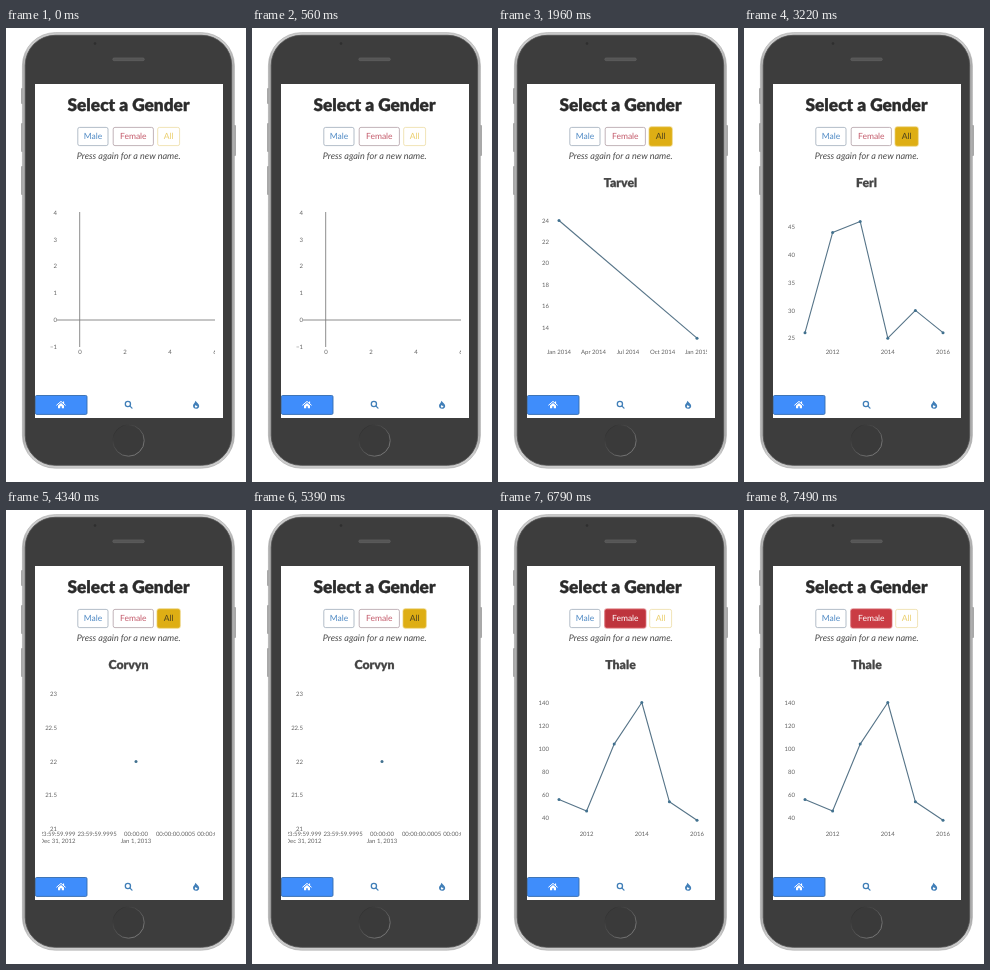
An HTML page that plays this animation: 240x454 px, repeating every 8 s.

```html
<!DOCTYPE html>
<html lang="en">
<head>
<meta charset="utf-8">
<title>Name popularity app</title>
<style>
  html, body { margin: 0; width: 100%; height: 100%; overflow: hidden; background: #fff; }
  svg { display: block; width: 100vw; height: 100vh; }
  text { font-family: Lato, "Open Sans", sans-serif; text-anchor: middle; text-rendering: geometricPrecision; }
  .round { font-weight: 900; stroke-linejoin: round; paint-order: stroke; }
  .label { font-size: 6px; fill: #606060; }
  .label.y { text-anchor: end; }
  .axis { stroke: #808080; stroke-width: .9; }
  .line { fill: none; stroke: #567488; stroke-width: 1.1; stroke-linejoin: round; }
  .dot { fill: #41718f; }
</style>
</head>
<body>
<svg id="stage" viewBox="0 0 240 454">
  <defs>
    <linearGradient id="rim" x2="1" y2="0">
      <stop offset="0" stop-color="#a9a9a9"/>
      <stop offset=".03" stop-color="#cbcbcb"/>
      <stop offset=".97" stop-color="#cbcbcb"/>
      <stop offset="1" stop-color="#a9a9a9"/>
    </linearGradient>
    <linearGradient id="ring" x2="1" y2="1">
      <stop offset=".15" stop-color="#333"/>
      <stop offset=".85" stop-color="#777"/>
    </linearGradient>
    <clipPath id="plot"><rect x="36" y="170" width="173" height="175"/></clipPath>
  </defs>

  <!-- phone -->
  <g fill="#a8a8a8">
    <rect x="15" y="60" width="3" height="16" rx="1"/>
    <rect x="15" y="95" width="3" height="29" rx="1"/>
    <rect x="15" y="138" width="3" height="29" rx="1"/>
    <rect x="227" y="97" width="3" height="31" rx="1"/>
  </g>
  <rect x="16.400" y="4.600" width="212" height="435.600" rx="33" fill="url(#rim)" stroke="#aaa" stroke-width=".6"/>
  <rect x="19.200" y="7.300" width="206.500" height="430" rx="30" fill="#3d3d3d" stroke="#505050" stroke-width=".8"/>
  <circle cx="89" cy="15.500" r="1.300" fill="#2e2e2e"/>
  <rect x="106.800" y="29.900" width="31.500" height="2.800" rx="1.400" fill="#555" stroke="#686868" stroke-width=".5"/>
  <circle cx="122.500" cy="412.500" r="15.700" fill="#3a3a3a" stroke="url(#ring)" stroke-width="1"/>
  <rect x="29" y="56" width="188" height="334" fill="#fff"/>

  <!-- page -->
  <text class="round" x="122.500" y="83" font-size="17.300" fill="#2b2b2b" stroke="#2b2b2b" stroke-width=".35">Select a Gender</text>
  <g id="buttons"></g>
  <text x="122.700" y="130.500" font-size="9.050" font-style="italic" fill="#4a4a4a">Press again for a new name.</text>
  <text id="name" class="round" x="122.500" y="159" font-size="12.300" fill="#444" stroke="#444" stroke-width=".25"></text>
  <g id="chart" clip-path="url(#plot)"></g>

  <!-- tab bar -->
  <rect x="29.400" y="367.500" width="51.600" height="18.900" rx="1.300" fill="#3f8dfb" stroke="#356cae" stroke-width=".9"/>
  <g fill="#fff">
    <path d="M50.700 377.100 L55 373.400 L59.300 377.100" fill="none" stroke="#fff" stroke-width="1" stroke-linecap="round"/>
    <path d="M52 377.500 L55 375 L58 377.500 V380.200 H55.800 V378.300 H54.200 V380.200 H52 Z"/>
    <rect x="57" y="373.500" width="1.100" height="2"/>
  </g>
  <g fill="none" stroke="#417fb8" stroke-width="1.300" stroke-linecap="round">
    <circle cx="121.900" cy="376" r="2.600"/>
    <path d="M124 378.100 L126 380.100"/>
  </g>
  <path d="M189.500 372.800 C190.500 374.600 193.200 375.800 193.200 377.900 C193.200 379.700 191.800 380.800 190.100 380.800 C188.300 380.800 187 379.600 187 377.800 C187 376 189 375.100 189.500 372.800 Z M190.100 379.500 C191.400 379.400 191.800 378.200 191 377.400 L190.300 378 L189.500 376.900 C188.400 378.200 188.700 379.500 190.100 379.500 Z" fill="#417fb8" fill-rule="evenodd"/>
</svg>

<script>
const LOOP = 8000, TICK = 70;
const byId = id => document.getElementById(id);

function add(parent, tag, attrs, text = "") {
  const el = document.createElementNS("http://www.w3.org/2000/svg", tag);
  for (const key in attrs) el.setAttribute(key, attrs[key]);
  el.textContent = text;
  parent.append(el);
  return el;
}

const yearTicks = [[88.6, "2012"], [143.8, "2014"], [199, "2016"]];

// Each y axis: first value, its position, value step, pixel step, label count
const scenes = [
  { at: 0, name: "", y: [4, 184.5, -1, 26.9, 6],
    x: [[74, "0"], [119, "2"], [164, "4"], [209, "6"]], axes: true, data: [] },
  { at: 1960, name: "Tarvel", y: [24, 192.5, -2, 21.4, 6],
    x: [[61, "Jan 2014"], [95.5, "Apr 2014"], [130, "Jul 2014"], [164.5, "Oct 2014"], [199, "Jan 2015"]],
    data: [24, 13] },
  { at: 3150, name: "Ferl", y: [45, 199, -5, 27.8, 5], x: yearTicks,
    data: [26, 44, 46, 25, 30, 26] },
  { at: 4340, name: "Corvyn", y: [23, 184, -.5, 33.75, 5],
    x: [[51.5, "23:59:59.999", "Dec 31, 2012"], [91, "23:59:59.9995"], [130, "00:00:00", "Jan 1, 2013"],
        [169.5, "00:00:00.0005"], [209, "00:00:00.001"]],
    data: [22] },
  { at: 5880, name: "Thale", y: [140, 192.5, -20, 23.1, 6], x: yearTicks,
    data: [56, 46, 104, 140, 54, 38] }
];

function drawChart({ name, y, x, axes, data }) {
  const chart = byId("chart");
  chart.replaceChildren();
  byId("name").textContent = name;
  const [top, topY, step, gap, count] = y;
  const yOf = v => topY + (v - top) / step * gap;

  if (axes) {
    add(chart, "path", { class: "axis", d: "M51 292H209M73.700 184V319" });
  }
  for (let i = 0; i < count; i++) {
    const v = top + i * step;
    add(chart, "text", { class: "label y", x: 51, y: yOf(v) + 2.1 }, String(v).replace("-", "\u2212"));
  }
  for (const [px, ...rows] of x) {
    rows.forEach((row, i) => add(chart, "text", { class: "label", x: px, y: 325.6 + i * 7.8 }, row));
  }
  const points = data.map((v, i) => [data.length > 1 ? 61 + 138 * i / (data.length - 1) : 130, yOf(v)]);
  if (points.length) add(chart, "polyline", { class: "line", points: points.join(" ") });
  for (const [cx, cy] of points) add(chart, "circle", { class: "dot", cx, cy, r: 1.5 });
}

const mix = (a, b, k) => `rgb(${a.map((v, i) => Math.round(v + (b[i] - v) * k))})`;
const white = [255, 255, 255];

function makeButton(label, x, width, { color, border, fill, pressed, active }) {
  const group = byId("buttons");
  const box = { x, y: 99.4, width, height: 18.2, rx: 1.8 };
  const glow = add(group, "rect", { ...box, fill: "none", stroke: mix(fill, white, .55), "stroke-width": 2.4 });
  const frame = add(group, "rect", { ...box, "stroke-width": .8 });
  const text = add(group, "text", { x: x + width / 2, y: 111.2, "font-size": 8.5 }, label);
  return (level, focused, down) => {
    glow.setAttribute("visibility", focused ? "visible" : "hidden");
    frame.setAttribute("fill", mix(white, down ? pressed : fill, level));
    frame.setAttribute("stroke", mix(border, fill, level));
    text.setAttribute("fill", mix(color, active, level));
  };
}

const male = makeButton("Male", 71.8, 30.2, {
  color: [78, 137, 196], border: [160, 172, 186],
  fill: [59, 135, 243], pressed: [40, 110, 200], active: white });
const female = makeButton("Female", 107.2, 40.2, {
  color: [196, 92, 108], border: [178, 160, 166],
  fill: [202, 60, 68], pressed: [190, 52, 61], active: white });
const all = makeButton("All", 151.7, 21.9, {
  color: [234, 206, 108], border: [236, 220, 164],
  fill: [222, 174, 20], pressed: [211, 162, 12], active: [76, 64, 28] });

const ramp = (t, from) => Math.min(1, Math.max(0, (t - from) / 140));
const within = (t, from, to) => t >= from && t < to;

let shown;
function render(time) {
  const t = Math.floor(time / TICK) * TICK;
  const scene = scenes.findLast(s => t >= s.at);
  if (scene !== shown) drawChart(shown = scene);

  const allDown = [1820, 2940, 4130].some(p => within(t, p, p + 140));
  const femaleDown = within(t, 5670, 5740) || within(t, 6790, 6930);
  male(0, false, false);
  all(ramp(t, 1540) - ramp(t, 5390), within(t, 1820, 5670), allDown);
  female(ramp(t, 5530), t >= 5670, femaleDown);
}

function loop() {
  render(performance.now() % LOOP);
  requestAnimationFrame(loop);
}
loop();
</script>
</body>
</html>
```
